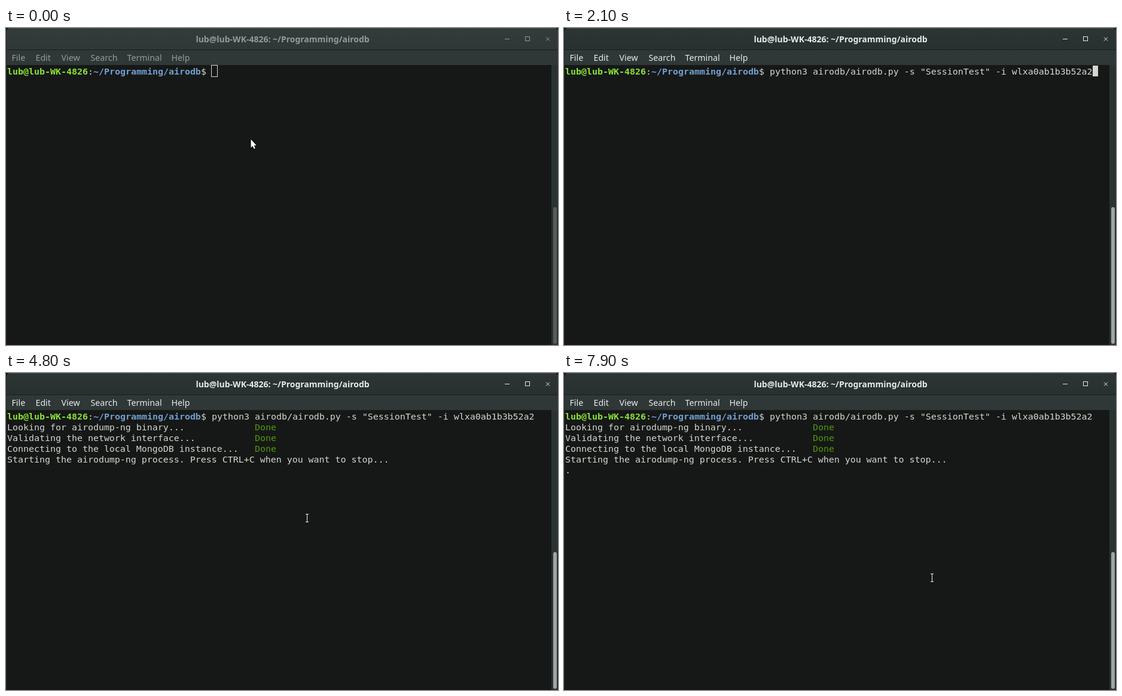
These frames come from a looping animation (923 px wide and 531 px high, 8000 ms). An HTML page with a canvas:

```html
<!DOCTYPE html>
<html lang="en">
<head>
<meta charset="utf-8">
<title>Terminal</title>
<style>
  html, body { margin: 0; width: 100%; height: 100%; overflow: hidden; background: #161817; }
  canvas { display: block; }
</style>
</head>
<body>
<canvas id="stage" width="923" height="531"></canvas>
<script>
const ctx = document.getElementById('stage').getContext('2d');
const W = 923, H = 531, LOOP = 8000, TICK = 100, BLINK = 600;
const CELL = 9, ROW = 18, LEFT = 2, TOP = 63;
const MONO = '14.95px "DejaVu Sans Mono", monospace';
const SANS = '"Noto Sans", sans-serif';
const FG = '#d3d7cf', GREEN = '#8ae234', BLUE = '#729fcf', DONE = '#4e9a06';

const FOCUS = 1100, RECALL = 1500, NEXT = 2100, ENTER = 3700, OUTPUT = 4000, DOT = 6300;
const USER = 'lub@lub-WK-4826';
const DIR = '~/Programming/airodb';
const PROMPT = USER.length + DIR.length + 3;
const COMMAND = 'python3 airodb/airodb.py -s "SessionTest" -i wlxa0ab1b3b52a2';
const STEPS = [
  'Looking for airodump-ng binary...',
  'Validating the network interface...',
  'Connecting to the local MongoDB instance...'
];
const FINAL = 'Starting the airodump-ng process. Press CTRL+C when you want to stop...';

// Mouse strokes: visible from show to hide, moving along a curve from start to end
const linear = u => u;
const easeOut = u => 1 - (1 - u) ** 2;
const STROKES = [
  { show: 400, start: 500, end: 900, hide: 1400, ease: linear, path: [[391, 180], [335, 155], [408, 150]] },
  { show: 2700, start: 2800, end: 3200, hide: ENTER, ease: easeOut, path: [[408, 150], [481, 262], [501, 236]] },
  { show: 4800, start: 4800, end: 5500, hide: 5600, ease: easeOut, path: [[501, 236], [400, 243], [463, 249]] },
  { show: 5600, start: 5600, end: 5900, hide: LOOP, ease: easeOut, path: [[463, 249], [590, 320], [613, 336]] }
];

const clamp = u => Math.min(1, Math.max(0, u));

function rect(x, y, w, h, color) {
  ctx.fillStyle = color;
  ctx.fillRect(x, y, w, h);
}

function rounded(x, y, w, h, radius, color) {
  ctx.fillStyle = color;
  ctx.beginPath();
  ctx.roundRect(x, y, w, h, radius);
  ctx.fill();
}

function text(str, x, y, color, font, align = 'left') {
  ctx.font = font;
  ctx.textAlign = align;
  ctx.fillStyle = color;
  ctx.fillText(str, x, y);
}

function put(str, col, row, color = FG, weight = '') {
  text(str, LEFT + col * CELL, TOP + row * ROW + 15, color, weight + MONO);
}

function drawButtons(ink) {
  rect(834, 18, 8, 1, ink);
  ctx.strokeStyle = ink;
  ctx.lineWidth = 1;
  ctx.strokeRect(868.5, 14.5, 7, 7);
  ctx.beginPath();
  ctx.moveTo(903, 15.5);
  ctx.lineTo(909, 21.5);
  ctx.moveTo(909, 15.5);
  ctx.lineTo(903, 21.5);
  ctx.stroke();
}

function drawWindow(focused) {
  rect(0, 0, W, H, '#161817');
  rect(0, 0, W, 36, '#0e1111');
  const bar = ctx.createLinearGradient(0, 0, 0, 36);
  bar.addColorStop(0, focused ? '#2c3434' : '#343b3b');
  bar.addColorStop(1, focused ? '#283030' : '#303737');
  rounded(1, 0, W - 1, 40, [5, 5, 0, 0], bar);
  rect(5, 0, W - 9, 1, focused ? '#414848' : '#434a4a');
  rect(1, 36, W - 1, 1, '#191e1e');
  rect(1, 37, W - 1, 25, '#303737');
  rect(0, 5, 1, H - 5, '#202524');

  const ink = focused ? '#e8eaea' : '#959999';
  text(`${USER}: ${DIR}`, 462.5, 24, ink, 'bold 14px ' + SANS, 'center');
  Object.entries({ File: 9, Edit: 49, View: 92, Search: 141, Terminal: 202, Help: 276 })
    .forEach(([label, x]) => text(label, x + 0.5, 55, ink, '14.2px ' + SANS));
  drawButtons(ink);

  rect(912, 62, 11, H - 62, '#2b3232');
  rounded(915, 300, 6, 229, 3, focused ? '#a0a4a4' : '#585d5c');
}

function drawText(t) {
  put(USER, 0, 0, GREEN, 'bold ');
  put(':', USER.length, 0);
  put(DIR, USER.length + 1, 0, BLUE, 'bold ');
  put('$', PROMPT - 2, 0);
  put(typed(t), PROMPT, 0);
  if (t >= OUTPUT) {
    STEPS.forEach((line, i) => {
      put(line, 0, i + 1);
      put('Done', 46, i + 1, DONE);
    });
    put(FINAL, 0, 4);
  }
  if (t >= DOT) put('.', 0, 5);
}

function typed(t) {
  return t >= NEXT ? COMMAND : t >= RECALL ? 'clear' : '';
}

function caretCell(t) {
  if (t >= DOT) return [1, 5];
  if (t >= OUTPUT) return [0, 5];
  if (t >= OUTPUT - TICK) return [0, 1];
  return [PROMPT + typed(t).length, 0];
}

function drawCaret(t, focused) {
  // Each key press restarts the blink
  const lit = t < ENTER ? NEXT - TICK : ENTER;
  if (t > lit && Math.floor((t - lit) / BLINK) % 2) return;
  const [col, row] = caretCell(t);
  const x = LEFT + col * CELL, y = TOP + row * ROW;
  if (focused) return rect(x, y, CELL, ROW, FG);
  ctx.strokeStyle = FG;
  ctx.strokeRect(x - 0.5, y - 0.5, 10, 19);
}

function drawBeam(t) {
  const stroke = STROKES.find(s => t >= s.show && t < s.hide);
  if (!stroke) return;
  const { start, end, ease, path: [a, b, c] } = stroke;
  const u = ease(clamp((t - start) / (end - start)));
  const [x, y] = [0, 1].map(i =>
    Math.round((1 - u) ** 2 * a[i] + 2 * u * (1 - u) * b[i] + u * u * c[i]));
  rect(x, y, 5, 1, '#f4f4f4');
  rect(x + 2, y + 1, 1, 12, '#f4f4f4');
  rect(x, y + 13, 5, 1, '#f4f4f4');
}

function drawArrow(x, y) {
  ctx.beginPath();
  [[0, 0], [0, 14], [3, 11], [5.2, 16], [7.4, 15], [5.3, 10.3], [9.3, 10]]
    .forEach(([dx, dy]) => ctx.lineTo(x + dx, y + dy));
  ctx.closePath();
  ctx.strokeStyle = '#000';
  ctx.lineWidth = 2;
  ctx.stroke();
  ctx.fillStyle = '#fff';
  ctx.fill();
}

function draw(t) {
  const focused = t >= FOCUS;
  drawWindow(focused);
  drawText(t);
  drawCaret(t, focused);
  if (t < STROKES[0].show) drawArrow(409.5, 186.5);
  drawBeam(t);
}

const origin = performance.now();
function frame() {
  const t = (performance.now() - origin) % LOOP;
  draw(Math.floor(t / TICK) * TICK);
  requestAnimationFrame(frame);
}
frame();
</script>
</body>
</html>
```
